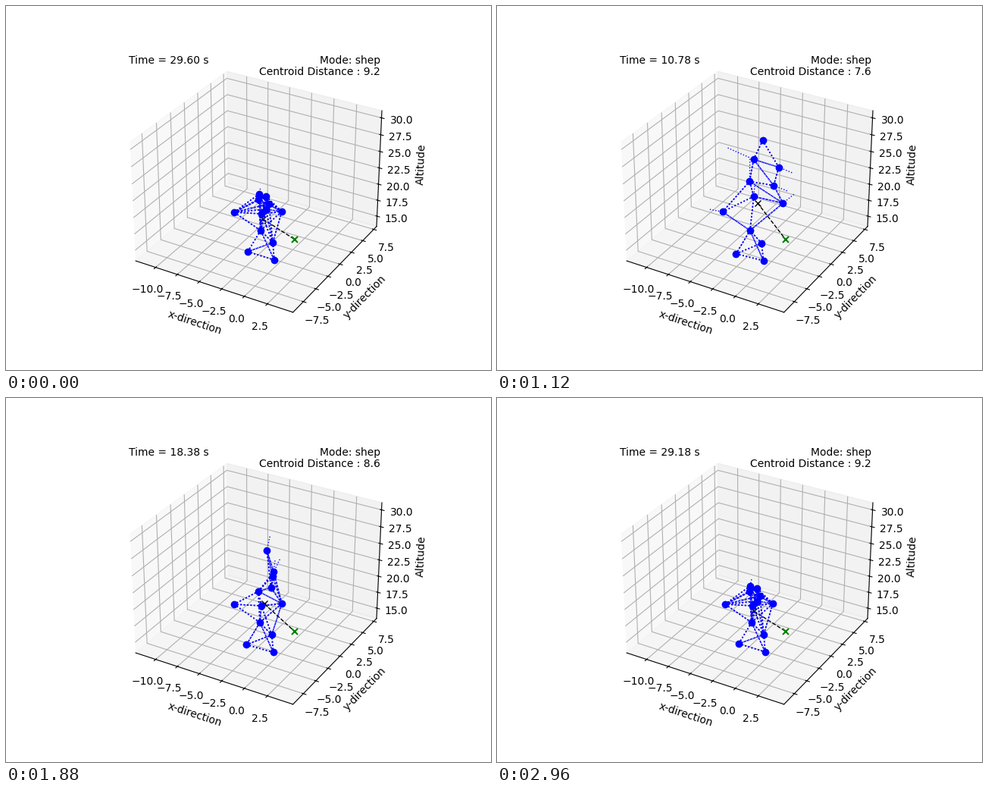
These frames come from a looping animation (640 by 480 pixels, 3 s). A matplotlib script:

```python
from itertools import combinations
import numpy as np
import matplotlib.pyplot as plt
from matplotlib.animation import FuncAnimation
from matplotlib.collections import LineCollection

FRAMES, INTERVAL = 75, 40
STEP, SAMPLES, DT = 20, 1501, 0.02
TRAIL = 200
RADIUS = 57
TARGET = np.array([380.5, 307.5])
LAST = SAMPLES * DT


def ease(t, start, end):
    s = np.clip((t - start) / (end - start), 0, 1)
    return s * s * (3 - 2 * s)


class Agent:
    """Moves from a start point along eased legs of (point, begin, end)."""

    def __init__(self, depth, start, *legs):
        self.depth = depth
        self.start = np.array(start, float)
        self.legs = legs

    def at(self, t):
        t = np.asarray(t, float)[..., None]
        place, last = self.start, self.start
        for point, begin, end in self.legs:
            place = place + (np.array(point) - last) * ease(t, begin, end)
            last = np.array(point, float)
        return place


def high(start, gather, rest, settle=25):
    """Upper agents gather first, then sink into the group."""
    return Agent(56, start, (gather, 0, 15), (rest, 12, settle))


def low(depth, start, rest, begin=0, end=LAST):
    return Agent(depth, start, (rest, begin, end))


agents = [
    high((266, 170), (356, 210), (347, 261)),
    high((357, 171), (349, 179), (334, 248), settle=29),
    high((409, 228), (363, 209), (343, 251)),
    high((403, 252), (356, 233), (343, 268)),
    low(0, (334, 188), (333, 255), 3, 16),
    low(-30, (340, 237), (337, 274), 7, 16),
    low(0, (402, 240), (364, 271), 1.5, 17),
    low(0, (258, 264), (301, 272), 0, 13),
    low(0, (333, 296), (336, 296)),
    low(10, (348, 313), (352, 312)),
    low(47, (314, 328), (319, 324)),
    Agent(10, (351, 340), ((351, 336), 0, 4), ((354, 335), 4, LAST)),
]


def linked(t, points):
    """Pairs in range; the gaps in depth shrink with time."""
    shrink = np.exp(-t / 45)
    for i, j in combinations(range(len(agents)), 2):
        gap = (agents[i].depth - agents[j].depth) * shrink
        if np.hypot(np.hypot(*(points[i] - points[j])), gap) < RADIUS:
            yield points[i], points[j]


fig = plt.figure(figsize=(6.4, 4.8), dpi=100)
ax = fig.add_subplot(projection="3d")
ax.set(xlim=(-12.34, 5.24), ylim=(-9.52, 8.16), zlim=(13.37, 31.05),
       xlabel="x-direction", ylabel="y-direction", zlabel="Altitude")
ax.set_xticks(np.arange(-10, 2.6, 2.5))
ax.set_yticks(np.arange(-7.5, 7.6, 2.5))
ax.set_zticks(np.arange(15, 30.1, 2.5))
clock = ax.text2D(0.05, 0.95, "", transform=ax.transAxes)
ax.text2D(0.95, 0.95, "Mode: shep", ha="right", transform=ax.transAxes)
gauge = ax.text2D(0.948, 0.91, "", ha="right", transform=ax.transAxes)

# Flat layer in screen pixels for the moving parts
flat = fig.add_axes([0, 0, 1, 1])
flat.set(xlim=(0, 640), ylim=(480, 0))
flat.set_axis_off()
lead, = flat.plot([], [], "k--", lw=1, zorder=2)
centre, = flat.plot([], [], "kx", ms=6, zorder=2)
flat.plot(*TARGET, "gx", ms=6, mew=1.5, zorder=3)
trails = [flat.plot([], [], "b:", lw=1, zorder=2)[0] for _ in agents]
links = LineCollection([], colors="b", linestyles=":", linewidths=1.2, zorder=3)
flat.add_collection(links, autolim=False)
dots, = flat.plot([], [], "bo", ms=6, zorder=4)
cores, = flat.plot([], [], "o", color="#9040ff", ms=1, mew=0.5, zorder=5)


def draw(frame):
    i = (STEP * frame - STEP - 1) % SAMPLES
    t = i * DT
    points = np.array([a.at(t) for a in agents])
    dots.set_data(*points.T)

    mid = points.mean(axis=0)
    centre.set_data([mid[0]], [mid[1]])
    lead.set_data(*np.array([mid, TARGET]).T)

    # Each pair is drawn from both ends, so the dots interleave
    links.set_segments([s for p, q in linked(t, points)
                        for s in ((p, q), (q, p))])

    has_trail = i >= TRAIL
    past = np.linspace(t - TRAIL * DT, t, 50) if has_trail else np.empty(0)
    for agent, trail in zip(agents, trails):
        trail.set_data(*agent.at(past).T)
    cores.set_data(*points.T)
    cores.set_visible(not has_trail)

    distance = 7.3 + 1.95 / (1 + np.exp((16.3 - t) / 3.2))
    clock.set_text(f"Time = {t:.2f} s")
    gauge.set_text(f"Centroid Distance : {distance:.1f}")
    return [dots, cores, centre, lead, links, clock, gauge, *trails]


anim = FuncAnimation(fig, draw, frames=FRAMES, interval=INTERVAL,
                     repeat=True, repeat_delay=0, blit=False)
plt.show()
```
